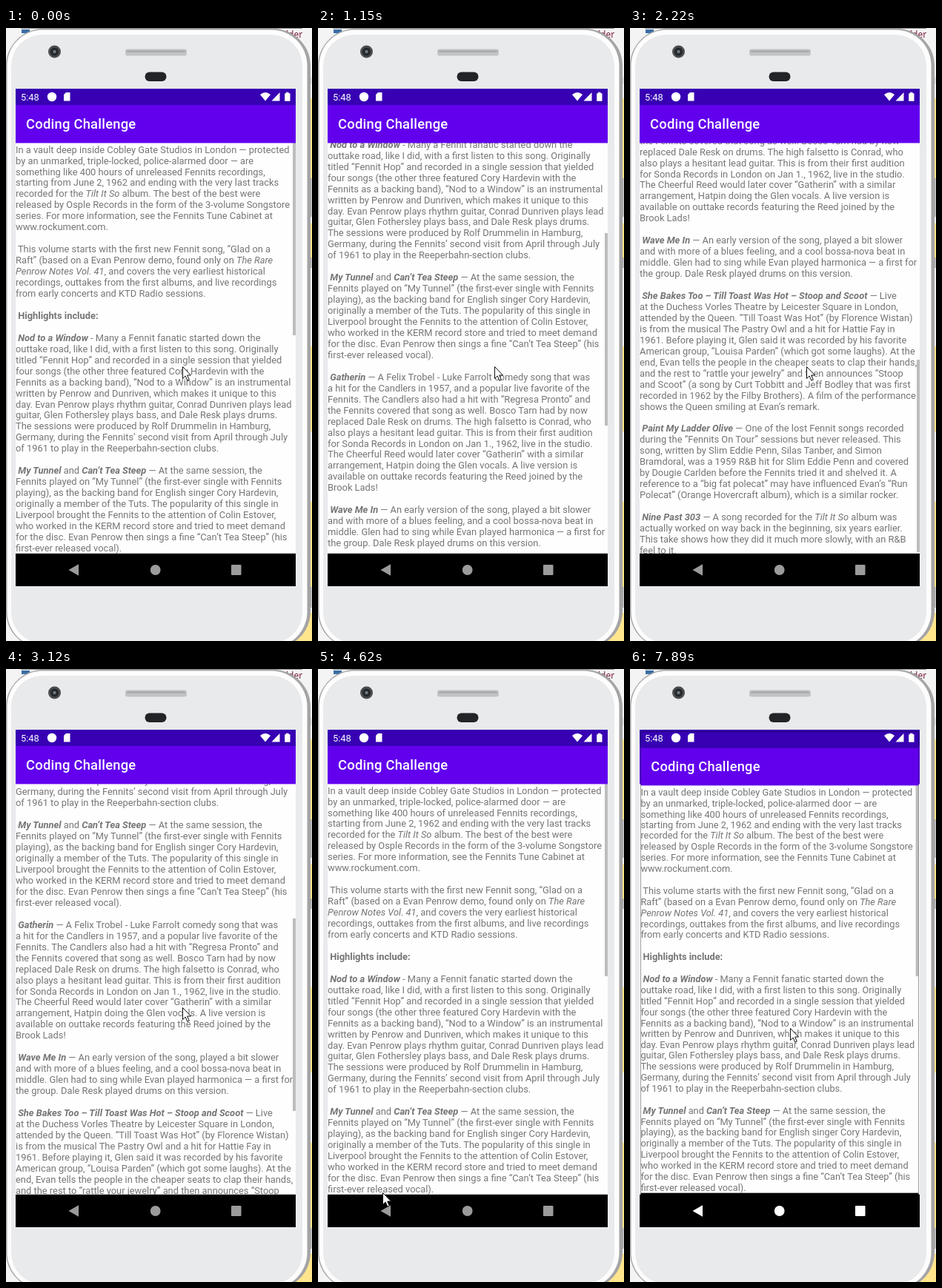
An HTML page that plays this animation: 413 px wide and 828 px high, repeating every 8 s.

```html
<!DOCTYPE html>
<html lang="en">
<head>
<meta charset="utf-8">
<title>Coding Challenge</title>
<style>
html, body { margin: 0; width: 100%; height: 100%; overflow: hidden; background: #f4f4f4; }
#stage { position: relative; width: 413px; height: 828px; overflow: hidden; font-family: Roboto, Arial, sans-serif; }
#stage > svg { position: absolute; left: 0; top: 0; }
#screen { position: absolute; left: 13px; top: 82px; width: 378px; height: 672px; overflow: hidden; background: #000; }
.window { position: absolute; inset: 0; overflow: hidden; background: #000; }
.window::before { content: ""; position: absolute; inset: 0 0 auto; height: 22px; background: #3700b3; }
.bar { position: absolute; top: 22px; width: 100%; height: 51px; box-sizing: border-box; padding-left: 14px; background: #6200ee; color: #fff; font-weight: 500; font-size: 18.4px; line-height: 52px; letter-spacing: .0125em; white-space: nowrap; }
.content { position: absolute; top: 73px; width: 100%; height: 555px; overflow: hidden; background: #fefefe; }
/* soft edges where the bars end between two pixels */
.content::after { content: ""; position: absolute; inset: 0; border: solid; border-width: 1px 0; border-color: rgba(98, 0, 238, .4) transparent rgba(0, 0, 0, .2); }
pre { position: absolute; left: 0; top: 2.6px; margin: 0; font: 12.86px/14.96px Roboto, Arial, sans-serif; color: #757575; white-space: pre; }
em { font-weight: 700; font-style: italic; }
#thumb { position: absolute; right: 0; top: 0; width: 4px; height: 260px; background: rgba(0, 0, 0, .26); }
.btn { position: absolute; left: 46px; width: 286px; height: 33px; border-radius: 17px; overflow: hidden; background: #6200ee; color: #fff; font-weight: 500; font-size: 12.86px; line-height: 34px; letter-spacing: .0893em; text-align: center; box-shadow: 0 1px 2px rgba(0, 0, 0, .35); }
#ripple { position: absolute; left: 158px; top: 8px; width: 0; height: 0; border-radius: 50%; transform: translate(-50%, -50%); background: rgba(255, 255, 255, .24); }
</style>
</head>
<body>
<div id="stage">
<svg width="413" height="828">
  <path d="M20 .5H400" stroke="#8a8a8a"/>
  <rect x="21" y="2" width="11" height="5" fill="#3a6ea5"/>
  <text x="378" y="13" font-family="Noto Sans, sans-serif" font-size="12" fill="#7a1f3d">lder</text>
  <path d="M405 95H413V205H405ZM405 264H413V312H405ZM405 430H413V545H405ZM405 640H413V755H405ZM385 790H413V828H385Z" fill="#ffe68c"/>
  <path d="M408 66H411.5V76H408ZM408 203H412.5V255H408ZM408 310H412.5V324H408ZM408 755H412.5V783H408Z" fill="#a9a9ab"/>
  <rect x="0" y="1" width="411" height="837" rx="50" fill="#a4a4a6"/>
  <rect x="1.5" y="2.5" width="405" height="834" rx="48" fill="#fdfdfd"/>
  <rect x="7" y="9" width="393" height="822" rx="42" fill="#e9eaec"/>
  <circle cx="65.500" cy="32" r="8.500" fill="#4a4c4e"/>
  <circle cx="65.500" cy="32" r="5.500" fill="#25282b"/>
  <circle cx="65.500" cy="32" r="2.200" fill="#6f7a80"/>
  <rect x="161" y="28.500" width="83" height="9" rx="3" fill="#c2c3c5"/>
  <rect x="163" y="30" width="79" height="3" rx="1.500" fill="#adaeb0"/>
  <rect x="187.500" y="59.500" width="29" height="12.500" rx="6.200" fill="#222427"/>
</svg>
<div id="screen">
  <div class="window" id="menu">
    <div class="bar">Coding Challenge</div>
    <div class="content">
      <div class="btn" style="top:281px">TEXT ONE</div>
      <div class="btn" style="top:325px">TEXT TWO<div id="ripple"></div></div>
      <div class="btn" style="top:370px">TEXT THREE</div>
    </div>
  </div>
  <div class="window" id="reader">
    <div class="bar">Coding Challenge</div>
    <div class="content">
<pre id="story">In a vault deep inside Cobley Gate Studios in London — protected
by an unmarked, triple-locked, police-alarmed door — are
something like 400 hours of unreleased Fennits recordings,
starting from June 2, 1962 and ending with the very last tracks
recorded for the <i>Tilt It So</i> album. The best of the best were
released by Osple Records in the form of the 3-volume Songstore
series. For more information, see the Fennits Tune Cabinet at
www.rockument.com.

 This volume starts with the first new Fennit song, “Glad on a
Raft” (based on a Evan Penrow demo, found only on <i>The Rare</i>
<i>Penrow Notes Vol. 41</i>, and covers the very earliest historical
recordings, outtakes from the first albums, and live recordings
from early concerts and KTD Radio sessions.

 <b>Highlights include:</b>

 <em>Nod to a Window</em> - Many a Fennit fanatic started down the
outtake road, like I did, with a first listen to this song. Originally
titled “Fennit Hop” and recorded in a single session that yielded
four songs (the other three featured Cory Hardevin with the
Fennits as a backing band), “Nod to a Window” is an instrumental
written by Penrow and Dunriven, which makes it unique to this
day. Evan Penrow plays rhythm guitar, Conrad Dunriven plays lead
guitar, Glen Fothersley plays bass, and Dale Resk plays drums.
The sessions were produced by Rolf Drummelin in Hamburg,
Germany, during the Fennits’ second visit from April through July
of 1961 to play in the Reeperbahn-section clubs.

 <em>My Tunnel</em> and <em>Can’t Tea Steep</em> — At the same session, the
Fennits played on “My Tunnel” (the first-ever single with Fennits
playing), as the backing band for English singer Cory Hardevin,
originally a member of the Tuts. The popularity of this single in
Liverpool brought the Fennits to the attention of Colin Estover,
who worked in the KERM record store and tried to meet demand
for the disc. Evan Penrow then sings a fine “Can’t Tea Steep” (his
first-ever released vocal).

 <em>Gatherin</em> — A Felix Trobel - Luke Farrolt comedy song that was
a hit for the Candlers in 1957, and a popular live favorite of the
Fennits. The Candlers also had a hit with “Regresa Pronto” and
the Fennits covered that song as well. Bosco Tarn had by now
replaced Dale Resk on drums. The high falsetto is Conrad, who
also plays a hesitant lead guitar. This is from their first audition
for Sonda Records in London on Jan 1., 1962, live in the studio.
The Cheerful Reed would later cover “Gatherin” with a similar
arrangement, Hatpin doing the Glen vocals. A live version is
available on outtake records featuring the Reed joined by the
Brook Lads!

 <em>Wave Me In</em> — An early version of the song, played a bit slower
and with more of a blues feeling, and a cool bossa-nova beat in
middle. Glen had to sing while Evan played harmonica — a first for
the group. Dale Resk played drums on this version.

 <em>She Bakes Too – Till Toast Was Hot – Stoop and Scoot</em> — Live
at the Duchess Vorles Theatre by Leicester Square in London,
attended by the Queen. “Till Toast Was Hot” (by Florence Wistan)
is from the musical The Pastry Owl and a hit for Hattie Fay in
1961. Before playing it, Glen said it was recorded by his favorite
American group, “Louisa Parden” (which got some laughs). At the
end, Evan tells the people in the cheaper seats to clap their hands,
and the rest to “rattle your jewelry” and then announces “Stoop
and Scoot” (a song by Curt Tobbitt and Jeff Bodley that was first
recorded in 1962 by the Filby Brothers). A film of the performance
shows the Queen smiling at Evan’s remark.

 <em>Paint My Ladder Olive</em> — One of the lost Fennit songs recorded
during the “Fennits On Tour” sessions but never released. This
song, written by Slim Eddie Penn, Silas Tanber, and Simon
Bramdoral, was a 1959 R&amp;B hit for Slim Eddie Penn and covered
by Dougie Carlden before the Fennits tried it and shelved it. A
reference to a “big fat polecat” may have influenced Evan’s “Run
Polecat” (Orange Hovercraft album), which is a similar rocker.

 <em>Nine Past 303</em> — A song recorded for the <i>Tilt It So</i> album was
actually worked on way back in the beginning, six years earlier.
This take shows how they did it much more slowly, with an R&amp;B
feel to it.</pre>
      <div id="thumb"></div>
    </div>
  </div>
</div>
<svg width="413" height="828">
  <g fill="#fff">
    <text x="20" y="97.800" font-size="12.86">5:48</text>
    <circle cx="62" cy="93" r="6.200"/>
    <path d="M81 87H86.500V98.500H78V90Z"/>
    <path d="M343 90Q350 84 357 90L350 98.500ZM369.500 87V98.500H358.500ZM376.200 88.200H378V86.800H381.500V88.200H383.500V98.800H376.200Z"/>
  </g>
  <rect id="press" x="44" y="710" width="96" height="44" rx="22" fill="#fff" opacity=".2"/>
  <g id="nav">
    <path d="M84.500 732L98 724.300V739.700Z"/>
    <circle cx="201.700" cy="732" r="6.900"/>
    <rect x="304" y="725" width="13.500" height="14" rx="1"/>
  </g>
  <path id="pointer" d="M.5 .5V16.500L4.200 13L6.800 19.200L9.300 18.100L6.700 12H11.500Z" fill="#fff" stroke="#111" stroke-width="1"/>
</svg>
</div>
<script>
const LOOP = 8000;
const $ = id => document.getElementById(id);

// Screen refreshes come in bursts: first, last, count.
const bursts = [
  [300, 580, 3], [880, 1150, 3], [1270, 1430, 2], [1710, 1950, 3],
  [2220, 2220, 1], [2340, 3240, 7], [3400, 3700, 3], [3820, 4360, 5],
  [4500, 4620, 2], [4740, 5500, 6], [5620, 5620, 1], [5900, 6470, 5],
  [6590, 6860, 3], [6990, 6990, 1], [7390, 7890, 5]
];
const ticks = [0];
for (const [a, b, n] of bursts)
  for (let i = 0; i < n; i++) ticks.push(n > 1 ? a + (b - a) * i / (n - 1) : a);

const scroll = [[160, 0], [580, 125], [760, 125], [1150, 261], [1430, 350], [1590, 350],
  [1950, 560], [2100, 560], [2220, 625], [3700, 220], [4500, 0]];
const pointer = [[3820, 238, 457], [4090, 204, 520], [4360, 83, 720], [4500, 83, 716],
  [4620, 87, 707], [4900, 89, 726], [5900, 90, 726], [6185, 118, 662], [6470, 169, 557],
  [6725, 206, 495], [6860, 213, 487], [6990, 216, 485]];
const opening = [[7640, 0], [7765, .32], [7890, .95]];
const ripple = [[7350, 0], [7640, 580]];

// Linear value of column c in a list of [time, ...values].
function track(keys, t, c = 1) {
  const i = keys.findIndex(k => k[0] > t);
  if (i === 0) return keys[0][c];
  if (i < 0) return keys[keys.length - 1][c];
  const a = keys[i - 1], b = keys[i];
  return a[c] + (b[c] - a[c]) * (t - a[0]) / (b[0] - a[0]);
}

function draw(t) {
  const y = t < 7000 ? Math.round(track(scroll, t)) : 0;
  $("story").style.transform = `translateY(${-y}px)`;
  $("thumb").style.transform = `translateY(${Math.round(y * .469)}px)`;

  const onMenu = t >= 5900, p = track(opening, t);
  $("reader").style.transform = onMenu ? `scale(${.85 + .15 * p})` : "none";
  $("reader").style.opacity = onMenu ? Math.min(1, p * 2.2) : 1;

  const size = t < 7700 ? track(ripple, t) : 0;
  $("ripple").style.width = $("ripple").style.height = size + "px";

  $("press").style.display = t > 5300 && t < 5620 ? "" : "none";
  $("nav").setAttribute("fill", t < 5620 ? "#9b9b9b" : "#fff");
  $("pointer").setAttribute("transform", `translate(${track(pointer, t)} ${track(pointer, t, 2)})`);
}

function frame() {
  const now = performance.now() % LOOP;
  draw(ticks.filter(k => k <= now).pop());
  requestAnimationFrame(frame);
}
frame();
</script>
</body>
</html>
```
